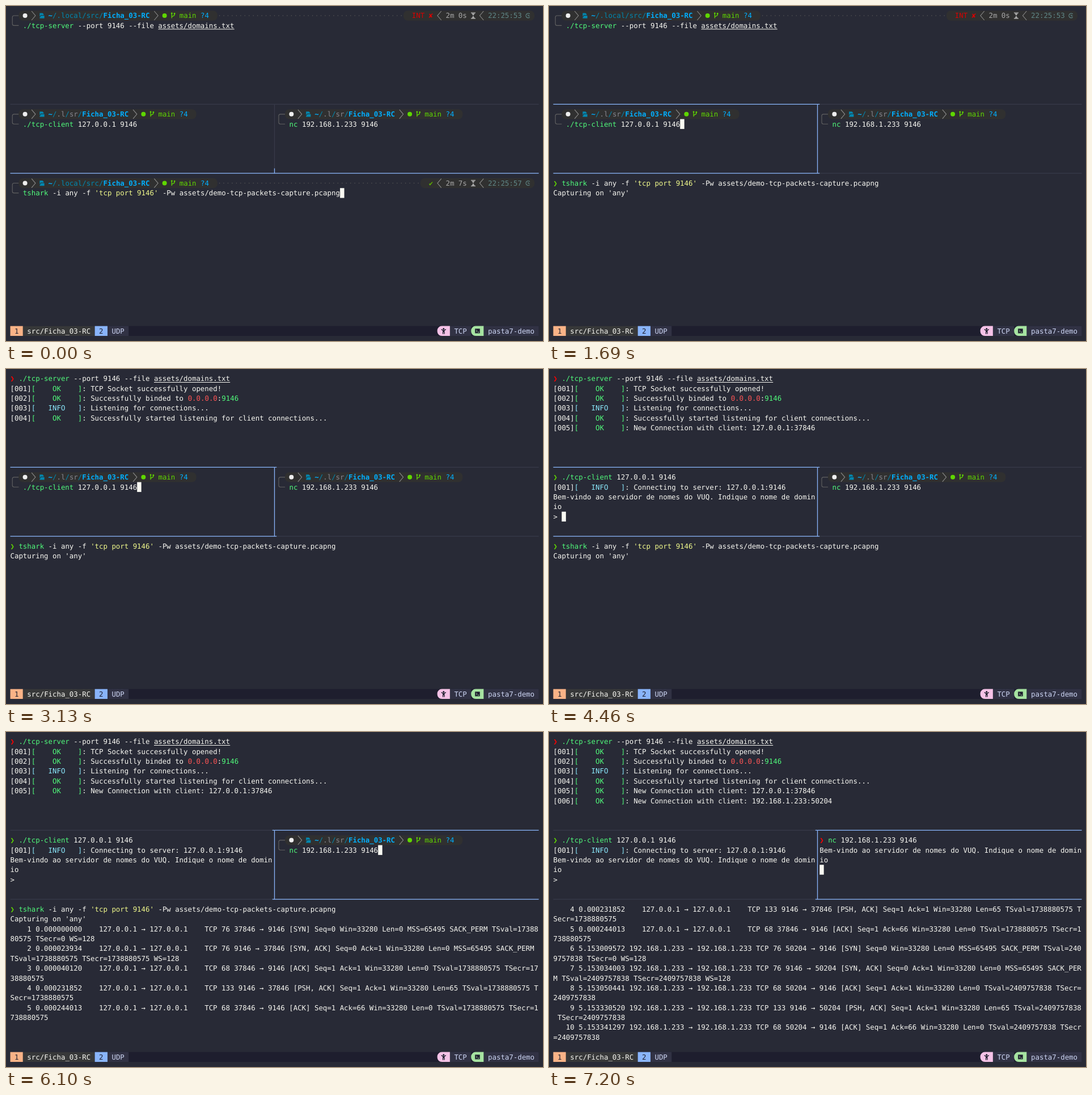
Animation, 947 px wide and 591 px high, one loop 8 s. Source, as an HTML page with a canvas:

```html
<!DOCTYPE html>
<html lang="pt">
<head>
<meta charset="utf-8">
<title>TCP terminal demo</title>
<style>
  html, body { margin: 0; width: 100%; height: 100%; overflow: hidden; background: #282a36; }
  canvas { display: block; width: 947px; height: 591px; }
</style>
</head>
<body>
<canvas></canvas>
<script>
const W = 947, H = 591, LOOP = 8000;
const CELL = 7.456, ROW = 17.385, LEFT = 7.5, TOP = 8.3, COLS = 125;
const PALETTE = {
  w: '#f8f8f2', g: '#50fa7b', y: '#f1fa8c', r: '#ff5555', c: '#8be9fd',
  d: '#0087af', s: '#87878f', b: '#00afff', m: '#5fd700', e: '#ff0000',
  i: '#d70000', o: '#5faf00', t: '#a8a8a8', k: '#5f8787', f: '#585858',
  l: '#cdd6f4', n: '#1e1e2e'
};
const ACTIVE = '#89b4fa', BORDER = '#373a49', SURFACE = '#313244', PILL = '#303030';

const canvas = document.querySelector('canvas');
const ctx = canvas.getContext('2d');
const dpr = window.devicePixelRatio || 1;
canvas.width = W * dpr;
canvas.height = H * dpr;

const X = col => LEFT + col * CELL;
const Y = row => TOP + row * ROW;
const midX = col => X(col + 0.5);
const midY = row => Y(row + 0.5);

function box(row, col, cells, color) {
  ctx.fillStyle = color;
  ctx.fillRect(X(col), Y(row), cells * CELL, ROW);
}

function path(points, color, width = 1.1) {
  ctx.strokeStyle = color;
  ctx.lineWidth = width;
  ctx.beginPath();
  points.forEach(([x, y]) => ctx.lineTo(x, y));
  ctx.stroke();
}

function shape(points, color) {
  ctx.fillStyle = color;
  ctx.beginPath();
  points.forEach(([x, y]) => ctx.lineTo(x, y));
  ctx.fill();
}

function disc(x, y, radius, color) {
  ctx.fillStyle = color;
  ctx.beginPath();
  ctx.arc(x, y, radius, 0, 7);
  ctx.fill();
}

// "§x" switches to palette colour x; an upper-case letter means bold.
function put(row, col, text) {
  let color = 'w';
  text.split(/§(.)/).forEach((part, i) => {
    if (i % 2) { color = part; return; }
    const key = color.toLowerCase();
    ctx.font = `${key === color ? '' : 'bold '}12.385px "DejaVu Sans Mono", monospace`;
    ctx.fillStyle = PALETTE[key];
    if (part.trim()) ctx.fillText(part, X(col), Y(row) + 13);
    col += part.length;
  });
}

// ---- prompt ----
function pill(row, from, to) {
  ctx.fillStyle = PILL;
  ctx.beginPath();
  ctx.roundRect(X(from), Y(row), (to - from) * CELL, ROW, CELL);
  ctx.fill();
}

function chevron(row, col, dir) {
  const x = midX(col), y = midY(row);
  path([[x - 3.4 * dir, y - 8], [x + 3.4 * dir, y], [x - 3.4 * dir, y + 8]], '#8a8a8a');
}

function folderIcon(row, col) {
  const x = midX(col), y = midY(row);
  shape([[x - 4, y - 4.5], [x + 1, y - 4.5], [x + 3, y - 2.5], [x + 3, y - 1], [x - 2, y - 1], [x - 4, y + 2]], PALETTE.d);
  shape([[x - 1.5, y], [x + 4.2, y], [x + 4.2, y + 4.7], [x - 4, y + 4.7], [x - 4, y + 3.5]], PALETTE.d);
}

function branchIcon(row, col) {
  const x = midX(col), y = midY(row);
  path([[x - 2.2, y - 4], [x - 2.2, y + 4.5]], PALETTE.m, 1.3);
  path([[x + 2.6, y - 3], [x + 2.3, y - 0.5], [x - 2.2, y + 2]], PALETTE.m, 1.3);
  disc(x - 2.2, y - 4, 1.4, PALETTE.m);
  disc(x + 2.6, y - 3.5, 1.4, PALETTE.m);
}

function prompt(row, pane, dir, dirLength) {
  const x = midX(pane), end = X(pane + 2), git = pane + 12 + dirLength;
  ctx.strokeStyle = '#626262';
  ctx.lineWidth = 1.1;
  ctx.beginPath();
  ctx.moveTo(end, midY(row));
  ctx.arcTo(x, midY(row), x, midY(row + 1), 3);
  ctx.arcTo(x, midY(row + 1), end, midY(row + 1), 3);
  ctx.lineTo(end, midY(row + 1));
  ctx.stroke();

  pill(row, pane + 2, git + 12 + 1);
  disc(midX(pane + 3), midY(row), 4, '#eeeeee');
  chevron(row, pane + 5, 1);
  folderIcon(row, pane + 7);
  put(row, pane + 9, dir);
  chevron(row, git - 2, 1);
  disc(midX(git), midY(row), 4, PALETTE.m);
  branchIcon(row, git + 2);
  put(row, git + 4, '§mmain §b?4');
}

function rightPrompt(row, start, status, elapsed, clock) {
  for (let col = 49; col < start; col++) disc(midX(col), midY(row), 0.8, PALETTE.f);
  pill(row, start, 124);
  put(row, start + 2, status);
  chevron(row, 101, -1);
  put(row, 103, '§t' + elapsed);
  chevron(row, 111, -1);
  put(row, 113, '§k' + clock);

  const y = midY(row), glass = midX(109), dial = midX(122);
  path([[glass - 4, y - 5], [glass + 4, y - 5]], PALETTE.t, 1.4);
  path([[glass - 4, y + 5], [glass + 4, y + 5]], PALETTE.t, 1.4);
  shape([[glass - 3, y - 4], [glass + 3, y - 4], [glass, y]], PALETTE.t);
  shape([[glass - 3, y + 5], [glass + 3, y + 5], [glass, y]], PALETTE.t);
  ctx.strokeStyle = PALETTE.k;
  ctx.lineWidth = 1.2;
  ctx.beginPath();
  ctx.arc(dial, y, 3.9, 0.8, 5.5);
  ctx.stroke();
  path([[dial, y - 2], [dial, y + 0.5], [dial + 3, y + 0.5]], PALETTE.k);
}

const LONG_DIR = ['§B~§d/.local/src/§BFicha_03-RC', 24];
const SHORT_DIR = ['§B~§d/§s.l§d/§ssr§d/§BFicha_03-RC', 19];

// ---- pane contents ----
const SERVER = '§g./tcp-server§w --port 9146 --file assets/domains.txt';
const CLIENT = '§g./tcp-client§w 127.0.0.1 9146';
const NETCAT = '§gnc§w 192.168.1.233 9146';
const TSHARK = "§gtshark§w -i any -f §y'tcp port 9146'§w -Pw assets/demo-tcp-packets-capture.pcapng";
const WELCOME = ['Bem-vindo ao servidor de nomes do VUQ. Indique o nome de domin', 'io'];
const OK = '§g[    OK    ]§w: ', INFO = '§c[   INFO   ]§w: ';

const SERVER_LOG = [
  [2410, OK + 'TCP Socket successfully opened!'],
  [2410, OK + 'Successfully binded to §r0.0.0.0§w:§g9146'],
  [2410, INFO + 'Listening for connections...'],
  [2410, OK + 'Successfully started listening for client connections...'],
  [4460, OK + 'New Connection with client: 127.0.0.1:37846'],
  [6950, OK + 'New Connection with client: 192.168.1.233:50204']
];

function handshake(first, ip, port, stamp, times) {
  const up = `${port} → 9146`, down = `9146 → ${port}`, win = 'Win=33280 Len=';
  const mss = 'MSS=65495 SACK_PERM ', val = `TSval=${stamp} TSecr=`, both = val + stamp;
  return [
    `76 ${up} [SYN] Seq=0 ${win}0 ${mss}${val}0 WS=128`,
    `76 ${down} [SYN, ACK] Seq=0 Ack=1 ${win}0 ${mss}${both} WS=128`,
    `68 ${up} [ACK] Seq=1 Ack=1 ${win}0 ${both}`,
    `133 ${down} [PSH, ACK] Seq=1 Ack=1 ${win}65 ${both}`,
    `68 ${up} [ACK] Seq=1 Ack=66 ${win}0 ${both}`
  ].flatMap((info, i) => {
    const number = String(first + i).padStart(5);
    const line = `${number} ${times[i]} ${ip.padStart(12)} → ${ip.padEnd(12)} TCP ${info}`;
    return [line.slice(0, COLS), line.slice(COLS)];
  });
}

const LOCAL = handshake(1, '127.0.0.1', 37846, 1738880575,
  ['0.000000000', '0.000023934', '0.000040120', '0.000231852', '0.000244013']);
const REMOTE = handshake(6, '192.168.1.233', 50204, 2409757838,
  ['5.153009572', '5.153034003', '5.153050441', '5.153330520', '5.153341297']);

function serverPane(t) {
  const running = t >= 2410, col = running ? 2 : 3, row = running ? 0 : 1;
  if (running) {
    put(0, 0, '§e❯');
    SERVER_LOG.filter(([start]) => t >= start)
      .forEach(([, text], i) => put(i + 1, 0, `[00${i + 1}]${text}`));
  } else {
    prompt(0, 0, ...LONG_DIR);
    rightPrompt(0, 93, '§iINT ✘', '2m 0s', '22:25:53');
  }
  put(row, col, SERVER);
  const y = Y(row) + 15.2;
  path([[X(col + 32), y], [X(col + 50), y]], PALETTE.w, 1);
}

function clientPane(t) {
  if (t < 4460) {
    prompt(10, 0, ...SHORT_DIR);
    put(11, 3, CLIENT);
    return;
  }
  put(10, 0, '§m❯ ' + CLIENT);
  put(11, 0, `[001]${INFO}Connecting to server: 127.0.0.1:9146`);
  [...WELCOME, '>'].forEach((text, i) => put(12 + i, 0, text));
}

function netcatPane(t) {
  if (t < 6950) {
    prompt(10, 63, ...SHORT_DIR);
    put(11, 66, NETCAT);
    return;
  }
  put(10, 63, '§e❯ ' + NETCAT);
  WELCOME.forEach((text, i) => put(11 + i, 63, text));
}

function capturePane(t) {
  if (t < 900) {
    prompt(17, 0, ...LONG_DIR);
    rightPrompt(17, 97, '§o✔', '2m 7s', '22:25:57');
    put(18, 3, TSHARK);
    return;
  }
  const lines = ['§m❯ ' + TSHARK];
  if (t >= 1030) lines.push("Capturing on 'any'");
  if (t >= 4760) lines.push(...LOCAL);
  if (t >= 7200) lines.push(...REMOTE);
  lines.slice(-14).forEach((text, i) => put(17 + i, 0, text));
}

// ---- borders, cursor, status bar ----
function borders(pane) {
  const top = midY(9), bottom = midY(16), mid = midX(62), right = X(COLS);
  const line = (x1, y1, x2, y2, color) => path([[x1, y1], [x2, y2]], color, 1.3);
  line(LEFT, top, right, top, BORDER);
  line(LEFT, bottom, right, bottom, BORDER);
  line(mid, top, mid, bottom, BORDER);
  if (pane === 'server') {
    line(LEFT, top, right, top, ACTIVE);
    line(mid, top, mid, Y(10), ACTIVE);
  } else if (pane === 'capture') {
    line(LEFT, bottom, right, bottom, ACTIVE);
    line(mid, Y(16), mid, bottom, ACTIVE);
  } else {
    const [from, to] = pane === 'client' ? [LEFT, X(63)] : [X(62), right];
    line(from, top, to, top, ACTIVE);
    line(from, bottom, to, bottom, ACTIVE);
    line(mid, top, mid, bottom, ACTIVE);
  }
}

function badge(col, color) {
  ctx.fillStyle = color;
  ctx.beginPath();
  ctx.roundRect(X(col), Y(32), 3 * CELL, ROW, [8, 0, 0, 8]);
  ctx.fill();
}

function statusBar() {
  const y = midY(32), dark = PALETTE.n;
  box(32, 0, COLS, dark);
  box(32, 0, 3, '#fab387');
  box(32, 3, 17, '#373839');
  box(32, 20, 3, ACTIVE);
  box(32, 23, 5, SURFACE);
  put(32, 1, '§n1');
  put(32, 4, 'src/Ficha_03-RC');
  put(32, 21, '§n2');
  put(32, 24, '§lUDP');

  badge(101, '#f5c2e7');
  box(32, 104, 5, SURFACE);
  put(32, 105, '§lTCP');
  const x = midX(102);
  disc(x, y - 3.8, 1.5, dark);
  path([[x - 4, y - 3], [x - 1.3, y - 1], [x + 1.3, y - 1], [x + 4, y - 3]], dark, 1.4);
  path([[x, y - 1.5], [x, y + 2]], dark, 3);
  path([[x - 1.2, y + 1], [x - 1.2, y + 5.5]], dark, 1.3);
  path([[x + 1.2, y + 1], [x + 1.2, y + 5.5]], dark, 1.3);

  badge(109, '#a6e3a1');
  box(32, 112, 13, SURFACE);
  put(32, 113, '§lpasta7-demo');
  const tx = midX(110);
  ctx.fillStyle = dark;
  ctx.fillRect(tx - 4.3, y - 4, 8.6, 8);
  path([[tx - 2.6, y - 2], [tx - 0.6, y], [tx - 2.6, y + 2]], '#a6e3a1', 1);
  path([[tx + 0.4, y + 2], [tx + 2.8, y + 2]], '#a6e3a1', 1);
}

// start time, active pane, cursor row, cursor column
const FOCUS = [
  [0, 'capture', 18, 78], [900, 'capture', 18, 0], [1030, 'capture', 19, 0],
  [1690, 'client', 11, 30], [1930, 'server', 1, 53], [2410, 'server', 5, 0],
  [3130, 'client', 11, 30], [4460, 'client', 14, 2],
  [6100, 'netcat', 11, 87], [6950, 'netcat', 13, 63]
];

function draw(t) {
  ctx.setTransform(dpr, 0, 0, dpr, 0, 0);
  ctx.textRendering = 'geometricPrecision';
  ctx.fillStyle = '#282a36';
  ctx.fillRect(0, 0, W, H);
  serverPane(t);
  clientPane(t);
  netcatPane(t);
  capturePane(t);
  const [, pane, row, col] = FOCUS.findLast(([start]) => t >= start);
  borders(pane);
  box(row, col, 1, PALETTE.w);
  statusBar();
}

function tick() {
  draw(performance.now() % LOOP);
  requestAnimationFrame(tick);
}
tick();
</script>
</body>
</html>
```
